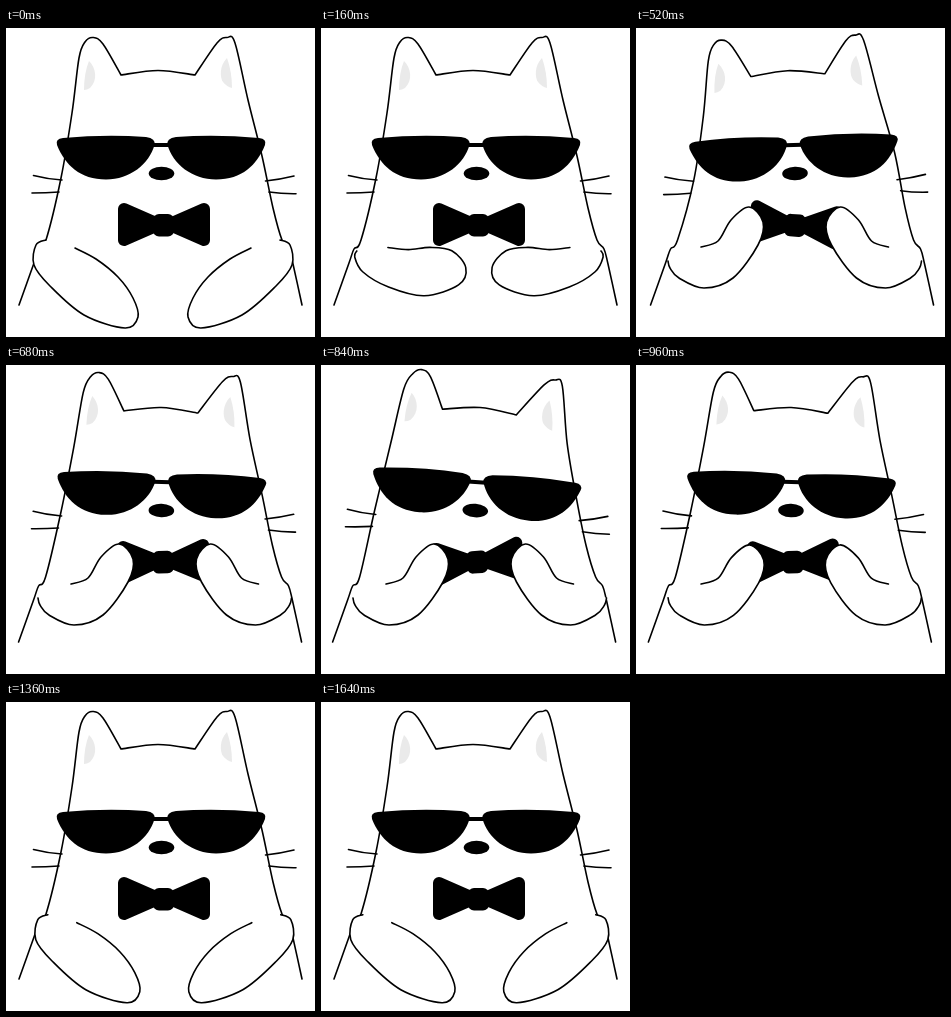
An HTML page that plays this animation: 309x309 px, repeating every 1680 ms.

```html
<!DOCTYPE html>
<html lang="en">
<head>
<meta charset="utf-8">
<title>Cool cat</title>
<style>
html, body { margin: 0; width: 100%; height: 100%; overflow: hidden; background: #fff; }
svg { display: block; width: 100vw; height: 100vh; }
.line { fill: #fff; stroke: #000; stroke-width: 1.6; stroke-linecap: round; stroke-linejoin: round; }
</style>
</head>
<body>
<svg viewBox="0 0 309 309">
  <path id="body" class="line"/>
  <g id="whiskers" class="line">
    <path d="M27.500 147.500Q41 151 56 152M26 165Q40 165 53 164"/>
    <path d="M259.500 153Q274 151.500 288 148M263 164Q276 166 290 165.800"/>
  </g>
  <g id="head">
    <g fill="#eaeaea">
      <path d="M83 33C90 40 92 52 84 60Q81 62 78 62Q78 45 83 33Z"/>
      <path d="M221 30C213 38 214 50 217 54Q221 59 226 60Q226 44 221 30Z"/>
    </g>
    <path id="lens" d="M51 117Q49 111 57 110Q100 106 140 109Q150 110.500 148.500 117C143 136 124 151.500 100 151.500C74 151.500 59 137 51 117Z"/>
    <use href="#lens" transform="matrix(-1 0 0 1 310 0)"/>
    <path d="M146 117H164" stroke="#000" stroke-width="4"/>
    <ellipse cx="155.500" cy="145.500" rx="12.800" ry="6.800"/>
  </g>
  <g id="bow">
    <path d="M118 181L150 195V198L118 212ZM198 181L166 195V198L198 212Z" stroke="#000" stroke-width="12" stroke-linejoin="round"/>
    <rect x="147" y="186" width="21" height="22.500" rx="6"/>
  </g>
  <path id="armL" class="line"/>
  <path id="armR" class="line"/>
</svg>
<script>
const LOOP = 1680, STEP = 40;
const PIVOT = { x: 155, y: 145 };
const $ = id => document.getElementById(id);
const points = s => s.split(' ').map(p => p.split(',').map(Number));
const mix = (a, b, k) => a + (b - a) * k;
const clamp = v => Math.max(0, Math.min(1, v));
const easeOut = u => 1 - (1 - clamp(u)) ** 2.3;
// Smooth rise and fall between two times.
const bump = (t, from, to) => Math.sin(Math.PI * clamp((t - from) / (to - from))) ** 2;

// Left side, crown, right side; they meet in corners.
const contour = [
  '13,277 28,235 33,221 40,212 55,150 66,85 73,30 79,14 87,9.5 97,16 115,47',
  '115,47 152,42.5 189,47',
  '189,47 211,15 221,9.5 229,15 242,72 256,128 267,180 276,212 283,221 287,236 296,277'
].map(points);

// The left arm; the right one is its mirror image.
const lowered = points('69,220 90,231 112,249 127,270 132,289 119,300 78,287 44,258 28,237 30,217 40,212');
const raised = points('65,219 82,213 95,192 113,179 127,194 122,217 97,250 68,260 43,250 34,240 32,233');

// Smooth curve through the points, without the opening move.
function curve(pts) {
  let d = '';
  for (let i = 0; i < pts.length - 1; i++) {
    const a = pts[i], b = pts[i + 1], p = pts[i - 1] || a, n = pts[i + 2] || b;
    const c = [0, 1].map(j => a[j] + (b[j] - p[j]) / 6);
    const e = [0, 1].map(j => b[j] - (n[j] - a[j]) / 6);
    d += 'C' + [...c, ...e, ...b].map(v => v.toFixed(2)).join(' ');
  }
  return d;
}

// The hand swings inwards on its way between the two poses.
function armPoints(k) {
  const swing = 17 * 4 * k * (1 - k);
  return lowered.map(([x, y], i) => {
    const reach = Math.sin(Math.PI * i / (lowered.length - 1)) ** 2;
    return [mix(x, raised[i][0], k) + swing * reach, mix(y, raised[i][1], k)];
  });
}

// The head turns fully, the waist stays put, the ears lean a little further.
function bend([x, y], deg, top, base, lean) {
  const w = bump(205 - y, 0, 200) * (y > 105) + (y <= 105);
  const r = deg * w * Math.PI / 180, c = Math.cos(r), s = Math.sin(r);
  const u = x - PIVOT.x, v = y - PIVOT.y;
  const shift = mix(base, top, w) + lean * clamp((45 - y) / 36);
  return [PIVOT.x + u * c - v * s + shift, PIVOT.y + u * s + v * c];
}

function place(id, dx, deg, y) {
  $(id).setAttribute('transform', `translate(${dx} 0) rotate(${deg} ${PIVOT.x} ${y})`);
}

function trace(id, ...runs) {
  $(id).setAttribute('d', 'M' + runs[0][0].join(' ') + runs.map(curve).join(''));
}

function draw(t) {
  const left = bump(t, 360, 720), right = bump(t, 560, 1080);
  const deg = 4.5 * right - 2.2 * left;
  const top = 3.6 * left - 1.2 * right;
  const base = 1.6 * left - 1.4 * right;

  trace('body', ...contour.map(run => run.map(p => bend(p, deg, top, base, 4.5 * right))));
  place('head', top, deg, PIVOT.y);
  place('whiskers', base, deg * 0.33, 157);
  place('bow', base, 4.5 * (left - right), 197);

  const lift = Math.min(easeOut((t - 40) / 440), easeOut((1340 - t) / 440));
  const settle = clamp((t - 1120) / 200);
  const arm = armPoints(lift);
  const axis = mix(314, 317.5, lift);
  trace('armL', arm.map(([x, y]) => [x + 1.8 * settle, y + 0.7 * settle]));
  trace('armR', arm.map(([x, y]) => [axis - x + 0.8 * settle, y + 0.7 * settle]));
}

const start = performance.now();
function tick() {
  const t = (performance.now() - start) % LOOP;
  draw(Math.floor(t / STEP) * STEP);
  requestAnimationFrame(tick);
}
tick();
</script>
</body>
</html>
```
